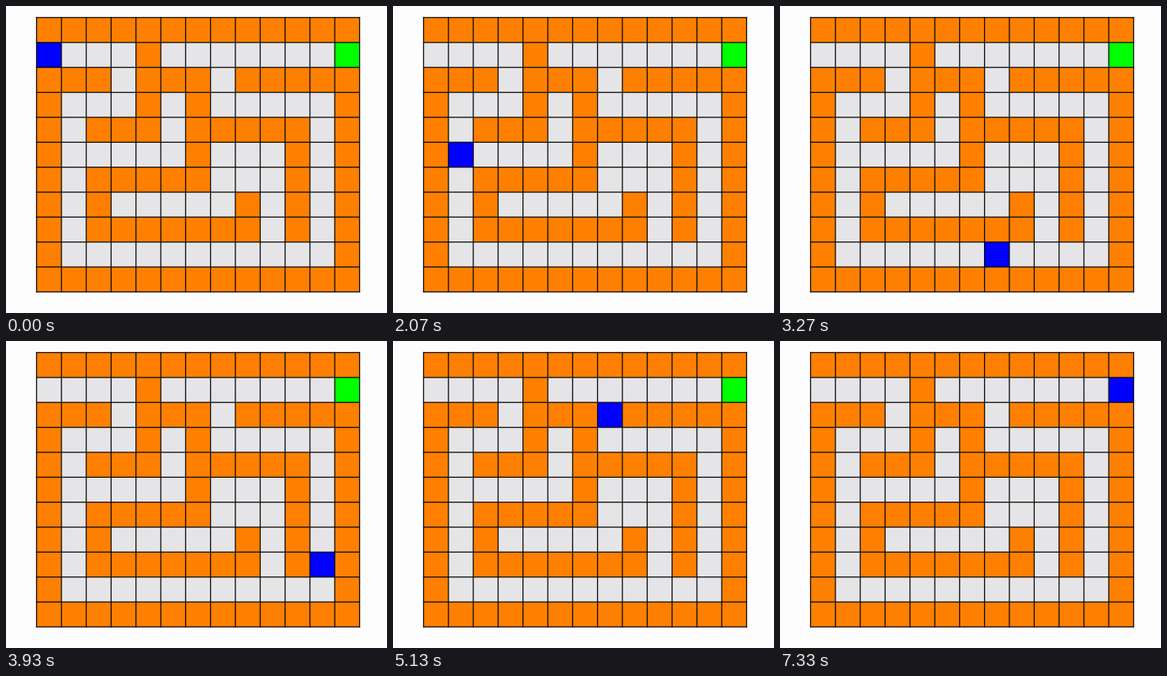
A matplotlib script for the animation above (7.47 s loop, 480 by 386 pixels).

```python
import matplotlib.pyplot as plt
from matplotlib.animation import FuncAnimation
from matplotlib.colors import ListedColormap
import numpy as np

W, H, DPI = 480, 386, 100
FRAMES, LOOP_MS = 112, 7470
START_MS, STEP_MS = 978, 120

MAZE = """
#############
....#.......G
###.###.#####
#...#.#.....#
#.###.#####.#
#.....#...#.#
#.#####...#.#
#.#.....#.#.#
#.#######.#.#
#...........#
#############
""".split()
# The short stub in the middle opens beside its neighbours
MAZE[2] = "###.###.#####"
MAZE[3] = "#...#.#.....#"

KINDS = ".#GP"
COLORS = ListedColormap(["#e5e4e6", "#ff8000", "#00ff00", "#0000ff"])
CORNERS = [(1, 0), (1, 3), (3, 3), (3, 1), (9, 1),
           (9, 11), (3, 11), (3, 7), (1, 7), (1, 12)]


def walk(corners):
    """Every cell visited along straight runs between corners."""
    cells = [corners[0]]
    for r1, c1 in corners[1:]:
        while cells[-1] != (r1, c1):
            r, c = cells[-1]
            cells.append((r + int(np.sign(r1 - r)), c + int(np.sign(c1 - c))))
    return cells


grid = np.array([[KINDS.index(ch) for ch in row] for row in MAZE])
path = walk(CORNERS)
rows, cols = grid.shape
xs = np.linspace(38.5, 445.5, cols + 1)
ys = np.linspace(14.5, 359.5, rows + 1)

fig = plt.figure(figsize=(W / DPI, H / DPI), dpi=DPI, facecolor="#fefdfe")
ax = fig.add_axes([0, 0, 1, 1])
ax.set(xlim=(0, W), ylim=(H, 0))
ax.axis("off")

cells = ax.pcolormesh(xs, ys, grid, cmap=COLORS, vmin=-0.5, vmax=3.5)
line = dict(colors="#0a0a0a", linewidths=1.3 * 72 / DPI,
            capstyle="projecting", snap=False)
ax.vlines(xs, ys[0], ys[-1], **line)
ax.hlines(ys, xs[0], xs[-1], **line)


def update(n):
    t = n * LOOP_MS / FRAMES
    step = int(np.clip((t - START_MS) // STEP_MS, 0, len(path) - 1))
    state = grid.copy()
    state[path[step]] = KINDS.index("P")
    cells.set_array(state)
    return [cells]


anim = FuncAnimation(fig, update, frames=FRAMES, interval=LOOP_MS / FRAMES,
                     repeat=True, repeat_delay=0, blit=False)
plt.show()
```
